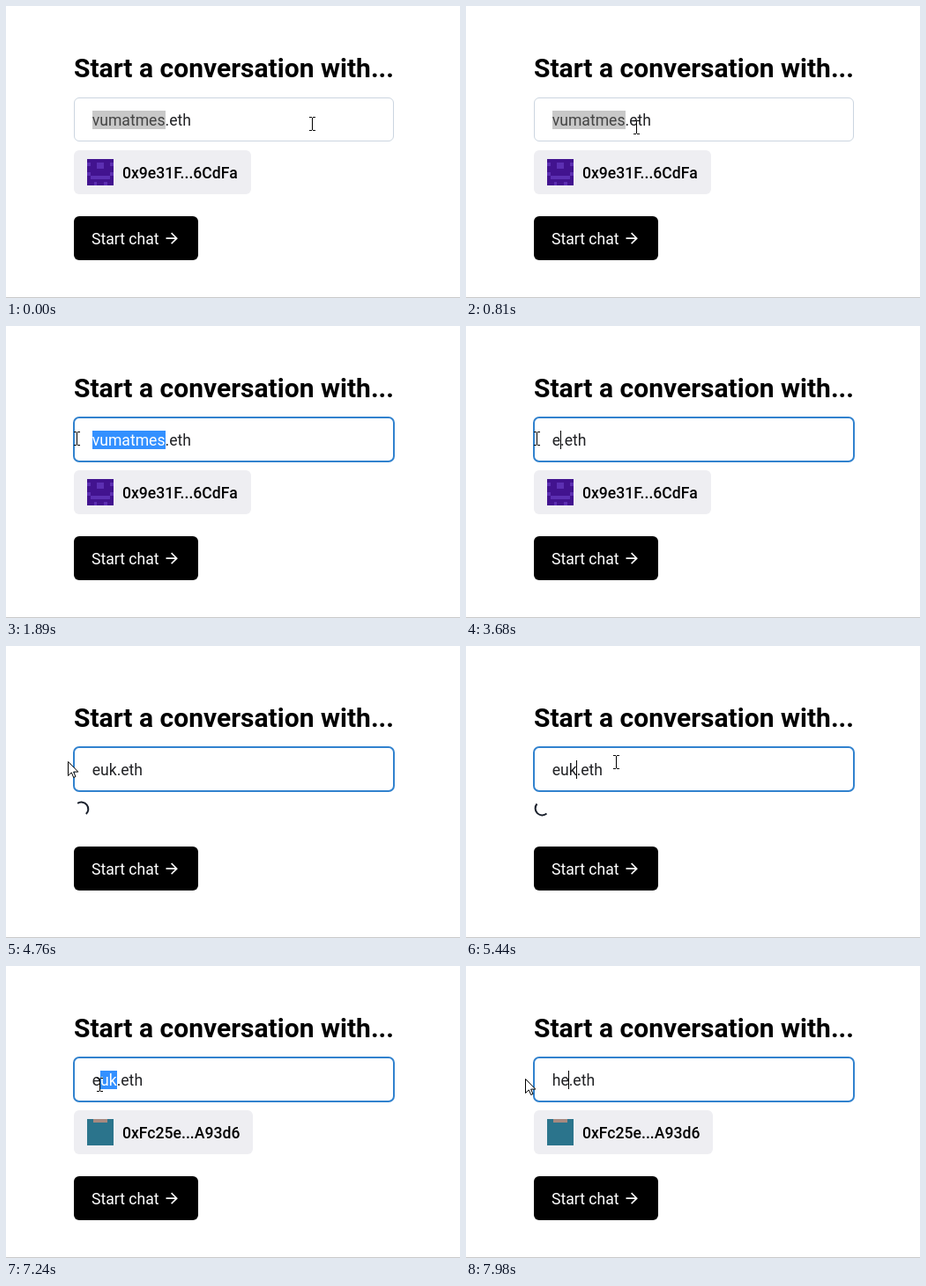
An HTML page that plays this animation: 515x332 px, repeating every 8 s.

```html
<!DOCTYPE html>
<html lang="en">
<head>
<meta charset="utf-8">
<title>Start a conversation</title>
<style>
  html, body { margin: 0; width: 100%; height: 100%; overflow: hidden; background: #fff; }
  svg { display: block; width: 100%; height: 100%; }
  text { font: 400 17.6px Roboto, sans-serif; fill: #202124; white-space: pre; }
  .title { font-size: 30px; font-weight: 600; fill: #000; }
  .address { font-weight: 500; fill: #000; }
</style>
</head>
<body>
<svg viewBox="0 0 515 332" xmlns="http://www.w3.org/2000/svg">
  <rect width="515" height="332" fill="#fff"/>
  <rect y="331" width="515" height="1" fill="#c9c9c9"/>

  <g id="top">
    <text class="title" x="77" y="81">Start a conversation with...</text>
    <rect id="box" fill="#fff"/>
    <rect id="mark" y="119" height="21"/>
    <text id="field" x="97.7" y="136"><tspan id="head"></tspan><tspan id="picked"></tspan><tspan id="tail"></tspan></text>
    <rect id="caret" y="119" width="1" height="21" fill="#000"/>
  </g>

  <g id="chip">
    <rect id="chipBack" x="77" y="164" height="50" rx="6" fill="#eeeef2"/>
    <g id="avatarA" transform="translate(92 174) scale(3.75)" shape-rendering="crispEdges">
      <rect width="8" height="8" fill="#42138f"/>
      <path fill="#5c2fb2" d="M0 1h1v1h-1zM7 1h1v1h-1zM3 1h2v2h-2zM0 4h1v1h-1zM7 4h1v1h-1zM1 5h6v1h-6zM2 7h1v1h-1zM5 7h1v1h-1z"/>
    </g>
    <g id="avatarB">
      <rect x="92" y="174" width="30" height="30" fill="#2b748c"/>
      <rect x="99" y="174" width="16" height="4" fill="#a88a80"/>
    </g>
    <text id="address" class="address" x="132" y="196"></text>
  </g>

  <path id="spinner" d="M-5.5 -5.5A7.8 7.8 0 0 1 5.5 5.5" fill="none" stroke="#1a202c" stroke-width="2"/>

  <g id="button">
    <rect x="77" y="239" width="141" height="50" rx="6"/>
    <text x="97" y="271" style="fill:#fff">Start chat</text>
    <path transform="translate(178.2 254.2) scale(.833)" fill="#fff"
      d="M12 4l-1.41 1.41L16.17 11H4v2h12.17l-5.58 5.59L12 20l8-8z"/>
  </g>

  <g id="pointer">
    <path id="beam" d="M-3.5-7.5h3m1 0h3M0-7v14M-3.5 7.5h3m1 0h3" fill="none" stroke="#000"/>
    <path id="arrow" d="M.5.5v16l3.8-3.6 2.4 5.6 2.3-1-2.4-5.4h5.2z" fill="#fff" stroke="#000"/>
  </g>
</svg>
<script>
const LOOP = 8000, TICK = 1000 / 15, BLINK = 535;
const FIELD_X = 97.7, NAME = 'vumatmes', SUFFIX = '.eth';
const LOAD_START = 4700, LOAD_END = 5900;

// time, x, y
const PATH = [
  [0, 347, 134], [800, 193, 138], [950, 193, 138], [1130, 190, 136],
  [1260, 181, 134], [1730, 68, 121], [1800, 86, 133], [1860, 80, 128],
  [4640, 80, 128], [4880, 52, 136], [5390, 170, 132], [5530, 170, 132],
  [6260, 126, 143], [6990, 126, 143], [7060, 134, 147], [7130, 126, 140],
  [7330, 56, 121], [7400, 67, 128]
];
// time, typed part
const TYPED = [[0, NAME], [3680, 'e'], [3820, 'eu'], [3960, 'euk'], [7920, 'h'], [7980, 'he']];
// press, release, length of the dragged word
const DRAGS = [[1260, 1800, 8], [7130, 7400, 3]];

const ui = {};
document.querySelectorAll('[id]').forEach(el => ui[el.id] = el);

const set = (el, attrs) => { for (const k in attrs) el.setAttribute(k, attrs[k]); };
const show = (el, on) => el.setAttribute('visibility', on ? 'inherit' : 'hidden');
const shift = (el, y) => el.setAttribute('transform', `translate(0 ${y})`);
const within = (t, a, b) => t >= a && t < b;

function pointerAt(t) {
  const i = PATH.findIndex(p => p[0] > t);
  if (i < 0) return PATH[PATH.length - 1].slice(1);
  const [t0, x0, y0] = PATH[i - 1], [t1, x1, y1] = PATH[i];
  const u = (t - t0) / (t1 - t0), k = u * u * (3 - 2 * u);
  return [x0 + (x1 - x0) * k, y0 + (y1 - y0) * k];
}

const charX = n => FIELD_X + (n ? ui.field.getSubStringLength(0, n) : 0);

function setText(text, from, to) {
  ui.head.textContent = text.slice(0, from);
  ui.picked.textContent = text.slice(from, to);
  ui.tail.textContent = text.slice(to);
}

function nearestIndex(x, max) {
  let best = 0;
  for (let n = 1; n <= max; n++) {
    if (Math.abs(charX(n) - x) < Math.abs(charX(best) - x)) best = n;
  }
  return best;
}

function draw(t) {
  const tick = Math.floor(t / TICK + 1e-6) * TICK;
  const [px, py] = pointerAt(tick);
  const focused = t >= 950, loading = within(t, LOAD_START, LOAD_END);
  const drag = DRAGS.find(d => within(t, d[0], d[1]));
  const word = TYPED.filter(k => k[0] <= t).pop()[1];
  const text = word + SUFFIX;

  // selection and caret
  let from = 0, to = 0, caret = word.length;
  setText(text, 0, 0);
  if (drag) {
    to = drag[2];
    from = caret = nearestIndex(px, to);
  } else if (t < 950 || within(t, 1800, 3680) || within(t, 7400, 7920)) {
    to = word.length;
  } else if (t < 1260) {
    caret = 10;
  }
  const selected = to > from;
  const left = Math.round(charX(from)), right = Math.round(charX(to));
  const caretX = Math.floor(charX(caret));
  setText(text, from, to);
  ui.picked.style.fill = focused ? '#fff' : '#444';
  set(ui.mark, { x: left, width: right - left, fill: focused ? '#3390ff' : '#c8c8c8' });
  show(ui.mark, selected);
  const blinkOn = !within(t, 3960, 7040) || Math.floor((t - 3960) / BLINK) % 2 === 0;
  ui.caret.setAttribute('x', caretX);
  show(ui.caret, focused && !selected && blinkOn);

  set(ui.box, focused
    ? { x: 77, y: 104, width: 363, height: 50, rx: 6, stroke: '#3182ce', 'stroke-width': 2 }
    : { x: 77.5, y: 104.5, width: 362, height: 49, rx: 5.5, stroke: '#cbd5e0', 'stroke-width': 1 });

  // result chip, or spinner in a shorter layout
  const second = t >= LOAD_END;
  shift(ui.top, loading ? 11 : 0);
  shift(ui.button, loading ? -11 : 0);
  show(ui.chip, !loading);
  show(ui.avatarA, !second);
  show(ui.avatarB, second);
  ui.chipBack.setAttribute('width', second ? 203 : 201);
  ui.address.textContent = second ? '0xFc25e...A93d6' : '0x9e31F...6CdFa';
  show(ui.spinner, loading);
  const angle = 180 + (tick - 5400) / 450 * 360;
  ui.spinner.setAttribute('transform', `translate(86 185) rotate(${angle})`);

  // pointer
  const beam = !!drag || px >= 77;
  show(ui.beam, beam);
  show(ui.arrow, !beam);
  const snap = beam ? 0.5 : 0;
  ui.pointer.setAttribute('transform', `translate(${Math.floor(px) + snap} ${Math.round(py)})`);
}

const start = performance.now();
function frame() {
  draw((performance.now() - start) % LOOP);
  requestAnimationFrame(frame);
}
frame();
</script>
</body>
</html>
```
